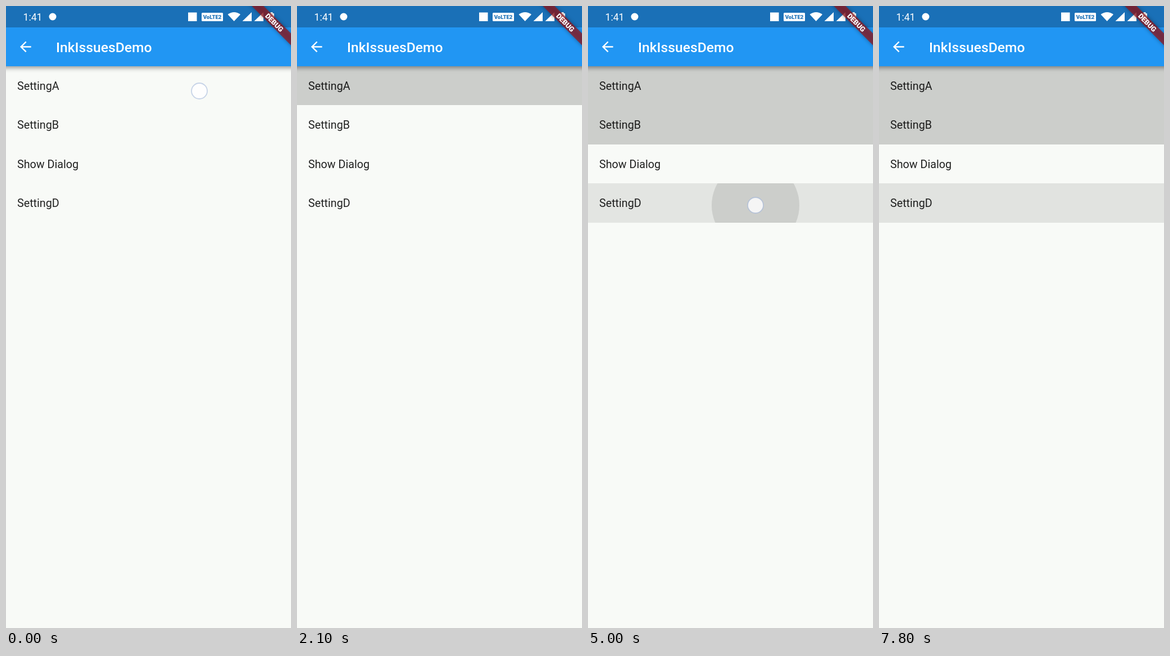
Animation, 507 px wide and 1105 px high, one loop 8000 ms. Source, as an HTML page with a canvas:

```html
<!DOCTYPE html>
<html lang="en">
<head>
<meta charset="utf-8">
<title>Ink ripples</title>
<style>
html, body { margin: 0; width: 100%; height: 100%; overflow: hidden; background: #f8faf7; }
canvas { display: block; }
</style>
</head>
<body>
<canvas id="stage" width="507" height="1105"></canvas>
<script>
const W = 507, H = 1105, LOOP = 8000, STEP = 100;
const ROW_TOP = 107, ROW_H = 69.4;
const ctx = document.getElementById('stage').getContext('2d');

const LABELS = ['SettingA', 'SettingB', 'Show Dialog', 'SettingD'];

// One round: hold a row, tap "Show Dialog", let go, tap "Regret".
const ROUNDS = [
  { row: 0, x: 344, y: 151, show: -100, press: 125, open: 870, lift: 1500, close: 1930, tap: [97, 313] },
  { row: 1, x: 341, y: 214, show: 2400, press: 2520, open: 3320, lift: 3800, close: 4050, tap: [113, 295] },
  { row: 3, x: 298, y: 354, show: 4600, press: 4740, open: 5458, lift: 6000, close: 6450, tap: [75, 306],
    from: [291, 353], clear: [7600, 8000] }
];

const clamp = v => Math.max(0, Math.min(1, v));
const ramp = (t, start, span) => clamp((t - start) / span);

function bezier(x1, y1, x2, y2) {
  const at = (a, b, s) => 3 * a * s * (1 - s) ** 2 + 3 * b * s * s * (1 - s) + s ** 3;
  return x => {
    if (x <= 0 || x >= 1) return clamp(x);
    let lo = 0, hi = 1;
    for (let i = 0; i < 24; i++) {
      const mid = (lo + hi) / 2;
      if (at(x1, x2, mid) < x) lo = mid; else hi = mid;
    }
    return at(y1, y2, lo);
  };
}
const ease = bezier(.25, .1, .25, 1);
const easeOut = bezier(0, 0, .58, 1);

function text(c, str, x, y, size, color, weight = 400) {
  c.font = `${weight} ${size}px Roboto, sans-serif`;
  c.fillStyle = color;
  c.fillText(str, x, y);
}

function box(c, x, y, w, h, r, color) {
  c.beginPath();
  c.roundRect(x, y, w, h, r);
  c.fillStyle = color;
  c.fill();
}

function disc(x, y, r, color) {
  ctx.beginPath();
  ctx.arc(x, y, r, 0, 7);
  ctx.fillStyle = color;
  ctx.fill();
}

function poly(color, ...pts) {
  ctx.beginPath();
  for (const [x, y] of pts) ctx.lineTo(x, y);
  ctx.fillStyle = color;
  ctx.fill();
}

const black = a => `rgba(0,0,0,${a})`;

function makeDialog() {
  const canvas = document.createElement('canvas');
  canvas.width = W;
  canvas.height = H;
  const c = canvas.getContext('2d');
  c.shadowColor = black(.38);
  c.shadowBlur = 40;
  c.shadowOffsetY = 15;
  box(c, 75.5, 452, 356, 238.5, 2, '#fdfffc');
  c.shadowColor = 'transparent';
  text(c, 'Rewind and remember', 105, 505, 24.67, '#212121', 500);
  text(c, 'You will never be satisfied.', 105, 553.5, 19.73, '#212121');
  text(c, 'You’re like me. I’m never satisfied.', 105, 577, 19.73, '#212121');
  text(c, 'Regret', 356, 657.5, 17.27, '#2196f3', 500);
  return canvas;
}
const dialog = makeDialog();
const arrow = new Path2D('M20 11H7.83l5.59-5.59L12 4l-8 8 8 8 1.41-1.41L7.83 13H20z');

function inRow(row, draw) {
  const top = Math.round(ROW_TOP + row * ROW_H);
  ctx.save();
  ctx.beginPath();
  ctx.rect(0, top, W, Math.round(ROW_TOP + (row + 1) * ROW_H) - top);
  ctx.clip();
  draw();
  ctx.restore();
}

function drawInk(t, r) {
  if (t < r.press) return;
  const keep = r.clear ? 1 - ramp(t, r.clear[0], r.clear[1] - r.clear[0]) : 1;
  const reach = Math.hypot(Math.max(r.x, W - r.x), 35);
  inRow(r.row, () => {
    ctx.fillStyle = black(.085 * ramp(t, r.press, 200) * keep);
    ctx.fillRect(0, 0, W, H);
    const first = 1 - ramp(t, r.open, 400);
    disc(r.x, r.y, reach * ramp(t, r.press, 1000), black(.1 * first));
    const done = ramp(t, r.close, 150);
    const radius = reach * ramp(t, r.open, 1000) + W * done;
    disc(r.x, r.y, radius, black(.1 * ramp(t, r.open, 180) * keep));
  });
  const age = t - r.open;
  if (age > 0 && age < 220) {
    inRow(2, () => disc(r.tap[0], r.tap[1], 1.28 * age, black(.12 * (1 - age / 220))));
  }
}

function drawTouch(t, x, y, start, end, fade = 220) {
  if (t < start || t >= end + fade) return;
  ctx.save();
  ctx.globalAlpha = 1 - ramp(t, end, fade);
  disc(x, y, 13.5, 'rgba(255,255,255,.8)');
  ctx.beginPath();
  ctx.arc(x, y, 14, 0, 7);
  ctx.lineWidth = 1.8;
  ctx.strokeStyle = 'rgba(165,185,220,.6)';
  ctx.stroke();
  ctx.restore();
}

function drawPage(t) {
  ctx.fillStyle = '#f8faf7';
  ctx.fillRect(0, 0, W, H);
  for (const r of ROUNDS) drawInk(t, r);
  LABELS.forEach((s, i) => text(ctx, s, 20, 149 + i * ROW_H, 19.73, black(.87)));

  ctx.save();
  ctx.shadowColor = black(.4);
  ctx.shadowBlur = 8;
  ctx.shadowOffsetY = 3;
  ctx.fillStyle = '#2196f3';
  ctx.fillRect(-10, 0, W + 20, 107);
  ctx.restore();
  ctx.fillStyle = '#1a70b7';
  ctx.fillRect(0, 0, W, 38);

  ctx.save();
  ctx.translate(20, 57.7);
  ctx.scale(1.233, 1.233);
  ctx.fillStyle = '#fff';
  ctx.fill(arrow);
  ctx.restore();
  text(ctx, 'InkIssuesDemo', 89, 82, 24.67, '#fff', 500);
}

function drawStatus(dim) {
  const white = '#fff', k = 1 - dim;
  text(ctx, '1:41', 30.5, 25.5, 17.6, white);
  disc(83, 19, 6.5, white);
  box(ctx, 324, 11.5, 15.5, 15.5, 0, white);
  box(ctx, 348, 12, 38, 15, 1.5, white);
  ctx.textAlign = 'center';
  text(ctx, 'VoLTE2', 367, 23, 9.6, `rgb(${26 * k},${112 * k},${183 * k})`, 900);
  ctx.textAlign = 'left';
  ctx.beginPath();
  ctx.moveTo(405.7, 27);
  ctx.lineTo(394.5, 15);
  ctx.quadraticCurveTo(405.7, 7, 417, 15);
  ctx.fillStyle = white;
  ctx.fill();
  for (const x of [437, 458]) poly(white, [x, 11], [x, 27], [x - 16.5, 27]);
  box(ctx, 468, 13, 9, 14, 1, white);
  box(ctx, 470.5, 11, 4, 3, 0, white);
}

function drawBanner() {
  ctx.save();
  ctx.translate(W, 0);
  ctx.rotate(Math.PI / 4);
  ctx.shadowColor = black(.5);
  ctx.shadowBlur = 7;
  ctx.fillStyle = 'rgba(150,22,28,.72)';
  ctx.fillRect(-60, 34.5, 120, 14.8);
  ctx.shadowColor = 'transparent';
  ctx.textAlign = 'center';
  text(ctx, 'DEBUG', 0, 46.3, 12.5, '#fff', 900);
  ctx.restore();
}

function render(t) {
  drawPage(t);
  let dim = 0;
  for (const r of ROUNDS) {
    const v = ramp(t, r.open, 150) - ramp(t, r.close, 150);
    if (v <= 0) continue;
    dim = .54 * ease(v);
    ctx.fillStyle = black(dim);
    ctx.fillRect(0, 0, W, H);
    ctx.globalAlpha = easeOut(v);
    ctx.drawImage(dialog, 0, 0);
    const press = ramp(t, r.close - 130, 100);
    box(ctx, 343, 629, 79, 44, 2, `rgba(120,195,250,${.2 * press})`);
    ctx.globalAlpha = 1;
  }
  drawStatus(dim);
  drawBanner();
  for (const r of ROUNDS) {
    const [x, y] = r.from && t < r.press ? r.from : [r.x, r.y];
    drawTouch(t, x, y, r.show, r.lift);
    drawTouch(t, r.tap[0], r.tap[1], r.open - 100, r.open);
    drawTouch(t, 381, 656, r.close - 130, r.close + 20, 120);
  }
  drawTouch(t, 339, 345, 7100, 7480, 200);
}

const origin = performance.now();
function tick() {
  const t = (performance.now() - origin) % LOOP;
  render(Math.floor(t / STEP) * STEP);
  requestAnimationFrame(tick);
}
tick();
</script>
</body>
</html>
```
